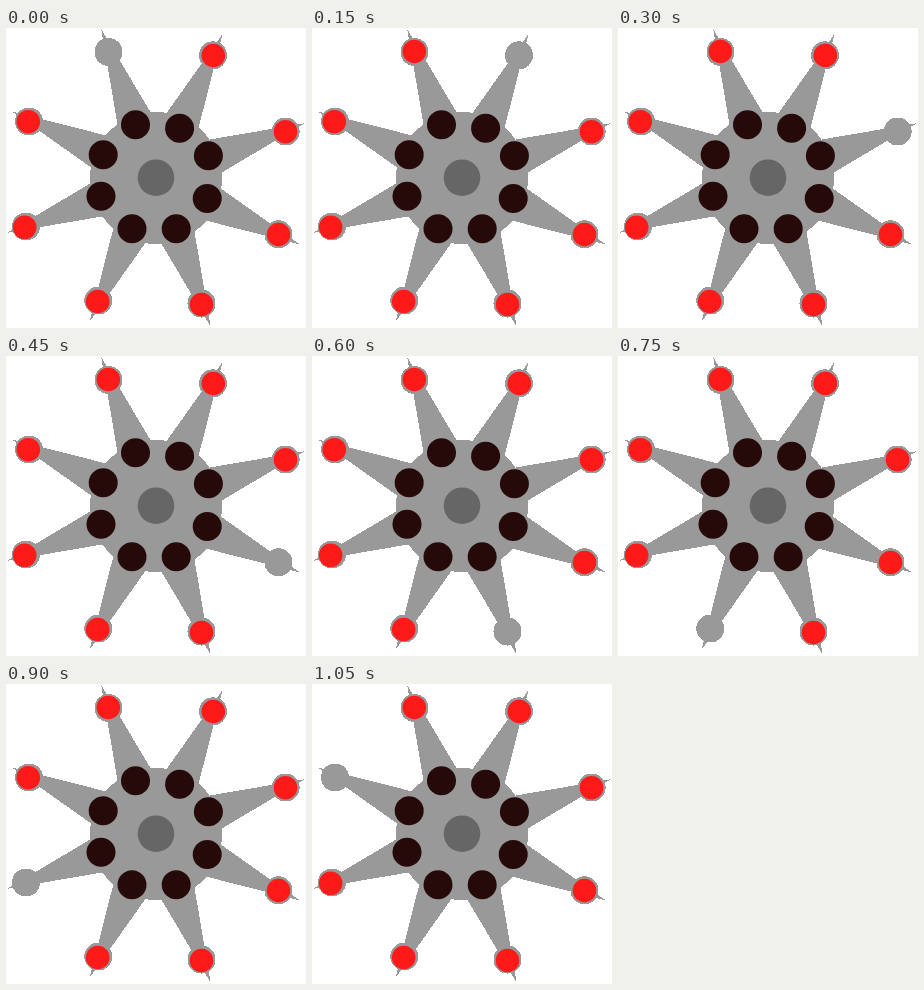
Write an HTML page that moves like this. It is 300x300 px and loops after 1.2 s.

```html
<!DOCTYPE html>
<html lang="en">
<head>
<meta charset="utf-8">
<title>Chasing lights</title>
<style>
  html, body { margin: 0; width: 100%; height: 100%; overflow: hidden; background: #fff; }
  svg { display: block; width: 100vw; height: 100vh; }
</style>
</head>
<body>
<svg id="stage" viewBox="0 0 300 300">
  <g id="body" fill="#999" shape-rendering="crispEdges">
    <circle cx="150" cy="150" r="66"/>
  </g>
  <circle cx="150" cy="149.7" r="18.3" fill="#666"/>
  <g id="holes" fill="#260a0a"></g>
  <g id="bulbs" fill="#ff1a1a"></g>
</svg>
<script>
const STEP = 150;
const knobs = [[102.5, 24], [207, 27.3], [279.7, 103.5], [272.5, 206.3],
               [195.5, 275.5], [92.3, 272.5], [20, 198.5], [23, 93.5]];
const lights = [[102.3, 23.5], [207.3, 27.5], [279.5, 103.7], [272.5, 206.5],
                [195.5, 276.5], [91.7, 273.5], [18.7, 199.3], [22.3, 93.7]];
const holes = [[129.5, 96.7], [173.6, 100.2], [202.4, 127.8], [201.2, 170.6],
               [170.2, 200.8], [126, 200.8], [95, 168.2], [97.2, 126.7]];

function add(parent, tag, attrs) {
  const el = document.createElementNS("http://www.w3.org/2000/svg", tag);
  for (const key in attrs) el.setAttribute(key, attrs[key]);
  return document.getElementById(parent).appendChild(el);
}

const dot = (parent, [cx, cy], r) => add(parent, "circle", { cx, cy, r });

for (let i = 0; i < 8; i++) {
  add("body", "path", {
    d: "M0-158.5L19.2-55H-19.2Z",
    transform: `translate(150 150) rotate(${45 * i - 20.2})`
  });
}
knobs.forEach(p => dot("body", p, 14));
holes.forEach(p => dot("holes", p, 14.5));
const bulbs = lights.map(p => dot("bulbs", p, 11.8));

// One bulb is dark at a time, moving clockwise.
function draw(t) {
  const off = Math.floor(t / STEP) % bulbs.length;
  bulbs.forEach((b, i) => b.setAttribute("visibility", i === off ? "hidden" : "visible"));
}

const start = performance.now();
function tick() {
  draw(performance.now() - start);
  requestAnimationFrame(tick);
}
tick();
</script>
</body>
</html>
```
